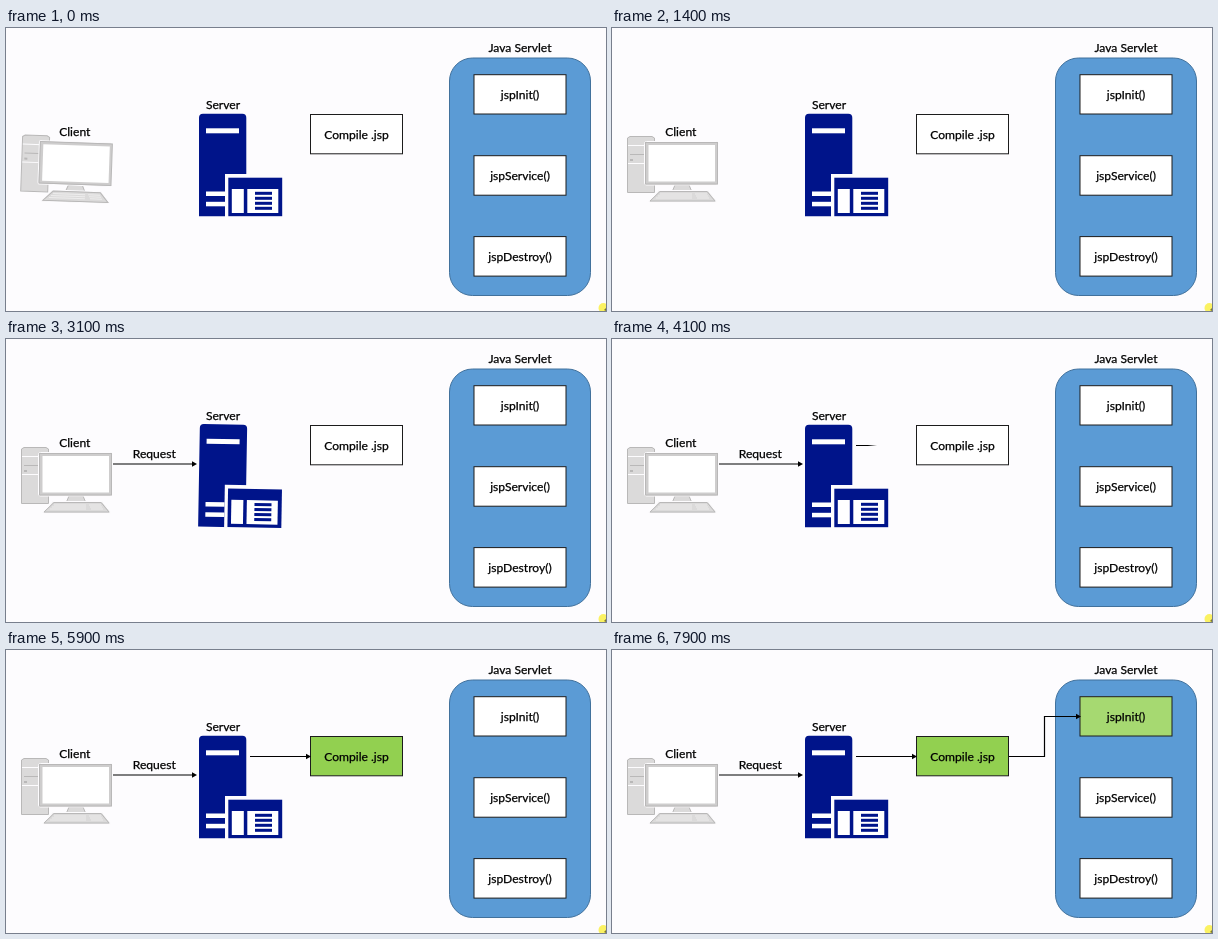
An HTML page with a canvas that plays this animation: 600 by 283 pixels, repeating every 8 s.

```html
<!DOCTYPE html>
<html lang="en">
<head>
<meta charset="utf-8">
<title>JSP life cycle</title>
<style>
html, body { margin: 0; width: 100%; height: 100%; overflow: hidden; background: #fdfcfe; }
canvas { display: block; }
</style>
</head>
<body>
<canvas id="stage" width="600" height="283"></canvas>
<script>
const ctx = document.getElementById('stage').getContext('2d');
const LOOP = 8000, STEP = 100;
const INK = '#000', NAVY = '#00148a', PAPER = '#fdfcfe';

const progress = (t, start, length = 500) => Math.min(1, Math.max(0, (t - start) / length));

function rect(color, x, y, w, h) {
  ctx.fillStyle = color;
  ctx.fillRect(x, y, w, h);
}

function polygon(points, fill, stroke) {
  ctx.beginPath();
  points.forEach(([x, y]) => ctx.lineTo(x, y));
  ctx.closePath();
  if (fill) { ctx.fillStyle = fill; ctx.fill(); }
  if (stroke) { ctx.strokeStyle = stroke; ctx.stroke(); }
}

function rounded(x, y, w, h, radius, fill, stroke) {
  ctx.beginPath();
  ctx.roundRect(x, y, w, h, radius);
  ctx.fillStyle = fill;
  ctx.fill();
  if (stroke) { ctx.strokeStyle = stroke; ctx.stroke(); }
}

// A hairline around the glyphs gives the slightly heavier weight.
function label(text, x, baseline, color = INK) {
  ctx.fillStyle = ctx.strokeStyle = color;
  ctx.lineWidth = 0.25;
  ctx.fillText(text, x, baseline);
  ctx.strokeText(text, x, baseline);
  ctx.lineWidth = 1;
}

function step(text, x, y, h, green = 0) {
  rect('#fff', x, y, 92, h);
  ctx.globalAlpha = green;
  rect('#92d050', x, y, 92, h);
  ctx.globalAlpha = 1;
  ctx.strokeStyle = '#1c1c1c';
  ctx.strokeRect(x, y, 92, h);
  label(text, x + 46, y + h / 2 + 4.5);
}

// Ink that is revealed from left to right behind a soft edge.
function wipeInk(x0, x1, p) {
  const width = x1 - x0, soft = width * 0.15;
  const edge = x0 + (width + soft) * p;
  const ink = ctx.createLinearGradient(edge - soft, 0, edge, 0);
  ink.addColorStop(0, 'rgba(0,0,0,1)');
  ink.addColorStop(1, 'rgba(0,0,0,0)');
  return ink;
}

function arrow(points, p, text, textX, baseline) {
  if (!p) return;
  const [tipX, tipY] = points[points.length - 1];
  const ink = p === 1 ? INK : wipeInk(points[0][0], tipX, p);
  ctx.strokeStyle = ink;
  ctx.lineWidth = 1.2;
  ctx.beginPath();
  points.forEach(([x, y], i) => ctx.lineTo(i === points.length - 1 ? x - 3 : x, y));
  ctx.stroke();
  ctx.lineWidth = 1;
  polygon([[tipX, tipY], [tipX - 5, tipY - 2.7], [tipX - 5, tipY + 2.7]], ink);
  if (text) label(text, textX, baseline, ink);
}

// One second of rocking: +2, -2, +2, -2 degrees and back to rest.
function teeterAngle(ms) {
  if (ms <= 0 || ms >= 1000) return 0;
  if (ms < 200) return 2 * Math.min(1, ms / 100);
  const swing = Math.floor(ms / 200), part = ms / 200 - swing;
  const from = swing % 2 ? 2 : -2;
  return swing === 4 ? -2 * (1 - part) : from * (1 - 2 * part);
}

function teeter(ms, cx, cy, paint) {
  ctx.save();
  ctx.translate(cx, cy);
  ctx.rotate(teeterAngle(ms) * Math.PI / 180);
  ctx.translate(-cx, -cy);
  paint();
  ctx.restore();
}

function client() {
  const body = '#dbdada', edge = '#b9b8b8';
  polygon([[15.5, 110], [18, 108.5], [40, 108.5], [42.5, 110], [42.5, 164.5], [15.5, 164.5]], body, edge);
  rect(PAPER, 16, 117, 26, 1);
  rect(PAPER, 16, 135, 26, 1);
  rect(edge, 18, 126, 14, 1);
  rect(edge, 18, 131, 3, 2);
  polygon([[63, 157], [77, 157], [80, 164], [60, 164]], body, edge);
  rounded(32.5, 113.5, 73.5, 43.5, 2, '#cecdcd', PAPER);
  ctx.strokeStyle = edge;
  ctx.strokeRect(33.5, 114.5, 72, 41.5);
  rect('#fff', 36.5, 117, 66.5, 36.5);
  polygon([[47, 162.5], [96, 162.5], [105, 174], [36.5, 174]], body, PAPER);
  polygon([[48, 163.5], [95, 163.5], [103, 173], [38, 173]], body, edge);
  for (let row = 0; row < 3; row++) {
    rect('#eeeded', 48 - row * 2, 165.5 + row * 2, 32 + row * 2, 1);
    rect('#eeeded', 83 + row, 165.5 + row * 2, 12, 1);
  }
}

function server() {
  rounded(193, 85.7, 47.3, 102.6, [4, 4, 0, 0], NAVY);
  rect('#fff', 200, 100.3, 33, 5);
  rect('#fff', 200, 163.5, 19, 4.5);
  rect('#fff', 200, 173.8, 19, 4.5);
  rect(PAPER, 219, 146, 58, 43);
  rect(NAVY, 222.3, 149.7, 53.9, 38.5);
  rect('#fff', 225.8, 161, 12, 24);
  rect('#fff', 241.3, 161, 31, 24);
  for (let i = 0; i < 4; i++) rect(NAVY, 249, 163.8 + i * 5, 17, 3);
}

function pointer() {
  ctx.fillStyle = '#fbf262';
  ctx.beginPath();
  ctx.arc(597.5, 280, 5, 0, Math.PI * 2);
  ctx.fill();
  polygon([[598, 282], [600, 280], [600, 283]], '#7d782c');
}

function draw(t) {
  rect(PAPER, 0, 0, 600, 283);
  ctx.font = '12.1px Lato, Carlito, sans-serif';
  ctx.textAlign = 'center';
  ctx.lineWidth = 1;

  teeter(t + 150, 60, 141, client);
  label('Client', 68.8, 108);
  teeter(t - 2550, 235, 137, server);
  label('Server', 217, 80.5);

  rounded(443.5, 30, 141, 237.5, 23, '#5b9bd5', '#41719c');
  label('Java Servlet', 514, 24);
  step('Compile .jsp', 304.5, 86.5, 39.3, progress(t, 4850, 800));
  step('jspInit()', 468, 46.7, 39.3, progress(t, 7250, 800));
  step('jspService()', 468, 127.7, 39.5);
  step('jspDestroy()', 468, 208.6, 39.5);

  arrow([[107, 125], [191, 125]], progress(t, 1450), 'Request', 148.3, 119);
  arrow([[244, 106.5], [305, 106.5]], progress(t, 3950));
  arrow([[397, 106.5], [432.5, 106.5], [432.5, 66.5], [469, 66.5]], progress(t, 6200));
  pointer();
}

const begin = performance.now();
function frame() {
  const t = (performance.now() - begin) % LOOP;
  draw(Math.floor(t / STEP) * STEP);
  requestAnimationFrame(frame);
}
frame();
</script>
</body>
</html>
```
